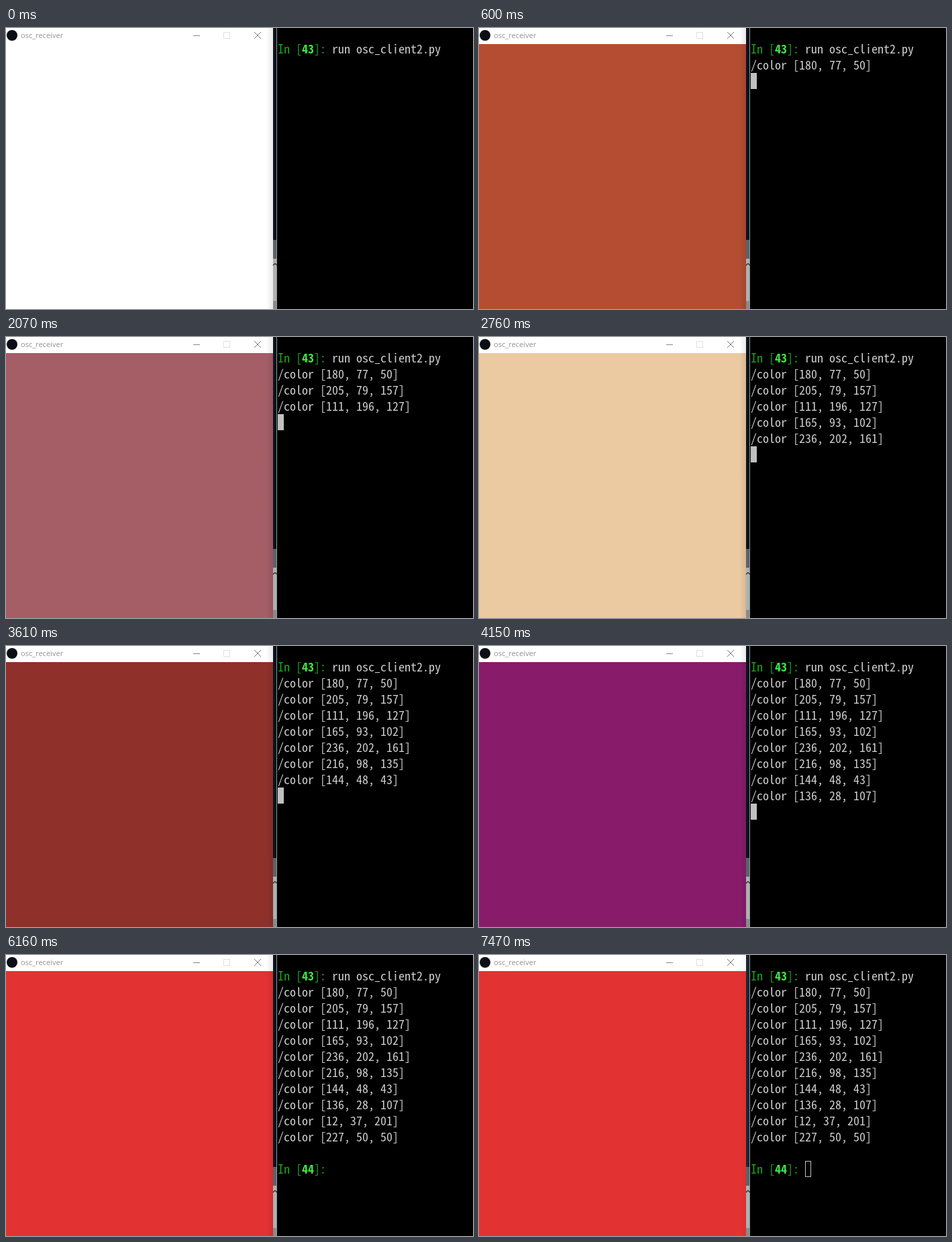
Animation of 696 by 419 pixels, one loop 7550 ms. Source, as an HTML page with a canvas:

```html
<!DOCTYPE html>
<html>
<head>
<meta charset="utf-8">
<style>
html, body { margin: 0; width: 100%; height: 100%; overflow: hidden; background: #000; }
canvas { display: block; }
</style>
</head>
<body>
<canvas id="stage" width="696" height="419"></canvas>
<script>
const ctx = document.getElementById('stage').getContext('2d');
const LOOP = 7550, LEFT = 405, TOP = 19, CELL = 9, LINE = 24;
const TEXT = '#ccc', GREY = '#c0c0c0', GREEN = '#16a816', BRIGHT = '#3fe63f';
const MONO = '"Noto Sans Mono CJK JP", "Noto Sans Mono", monospace';

const colors = `180, 77, 50
205, 79, 157
111, 196, 127
165, 93, 102
236, 202, 161
216, 98, 135
144, 48, 43
136, 28, 107
12, 37, 201
227, 50, 50`.split('\n');

// Messages go out at a steady rate; the screen refreshes once per tick
const START = 598, TICK = 77.2, TICKS_PER_MESSAGE = 6.45, PRINT_LAG = .3;
const PROMPT = 5620, BLINK = 515, UNFOCUS = 7470;

const shownAt = (i, lag = 0) =>
  START + TICK * Math.floor(i * TICKS_PER_MESSAGE + .6 + lag);

// Font size that gives one character per cell
ctx.font = `18px ${MONO}`;
const monoSize = 18 * CELL / ctx.measureText('0').width;

function rect(x, y, w, h, color) {
  ctx.fillStyle = color;
  ctx.fillRect(x, y, w, h);
}

function box(x, y, w, h, color) {
  ctx.strokeStyle = color;
  ctx.lineWidth = 1;
  ctx.strokeRect(x + .5, y + .5, w - 1, h - 1);
}

function line(x1, y1, x2, y2, color, width = 1) {
  ctx.strokeStyle = color;
  ctx.lineWidth = width;
  ctx.beginPath();
  ctx.moveTo(x1, y1);
  ctx.lineTo(x2, y2);
  ctx.stroke();
}

function print(text, col, row, color = TEXT, weight = 400) {
  ctx.font = `${weight} ${monoSize}px ${MONO}`;
  ctx.fillStyle = color;
  ctx.fillText(text, LEFT + col * CELL, TOP + row * LINE + 19);
}

function prompt(number, row) {
  print('In [', 0, row, GREEN);
  print(number, 4, row, BRIGHT, 700);
  print(']:', 6, row, GREEN);
}

function cursor(col, row, draw = rect) {
  draw(LEFT + col * CELL, TOP + row * LINE, CELL, LINE, GREY);
}

function drawWindow(fill, shadow) {
  rect(0, 0, 398, 24, '#fff');
  rect(0, 24, 398, 395, fill);
  const shade = ctx.createLinearGradient(388, 0, 398, 0);
  shade.addColorStop(0, 'rgba(0,0,0,0)');
  shade.addColorStop(1, `rgba(0,0,0,${shadow})`);
  rect(388, 0, 10, 419, shade);

  ctx.fillStyle = '#0c0e16';
  ctx.beginPath();
  ctx.arc(9, 11, 8, 0, 7);
  ctx.fill();
  ctx.font = '11px "Noto Sans", sans-serif';
  ctx.fillStyle = '#999';
  ctx.fillText('osc_receiver', 22, 15);

  line(279, 11.5, 289, 11.5, '#888');
  box(324, 6, 10, 10, '#e0e0e0');
  line(370, 6, 380, 16, '#777');
  line(380, 6, 370, 16, '#777');
}

function drawEdge(color) {
  rect(398, 0, 5, 316, color);
  rect(398, 316, 5, 28, '#5e6168');
  rect(398, 344, 5, 63, '#b0b0b0');
  rect(398, 407, 5, 12, '#8a8a8a');
  rect(403, 0, 1, 419, '#8a979c');
  line(398, 354, 401, 351, '#3c342c', 1.5);
  line(401, 351, 404, 354, '#3c342c', 1.5);
}

function drawTerminal(t) {
  rect(404, 0, 292, 419, '#000');
  prompt('43', 0);
  print('run osc_client2.py', 9, 0);
  const printed = colors.filter((_, i) => t >= shownAt(i, PRINT_LAG));
  printed.forEach((color, i) => print(`/color [${color}]`, 0, i + 1));

  if (t >= PROMPT) {
    prompt('44', 12);
    if (t >= UNFOCUS) cursor(9, 12, box);
    else if (Math.floor((t - PROMPT) / BLINK) % 2 === 0) cursor(9, 12);
  } else if (printed.length) {
    cursor(0, printed.length + 1);
  } else if (t >= 150) {
    cursor(27, 0);
  }
}

function frame() {
  const t = performance.now() % LOOP;
  const focused = t < UNFOCUS;
  const fill = colors.filter((_, i) => t >= shownAt(i)).pop();
  drawTerminal(t);
  drawWindow(fill ? `rgb(${fill})` : '#fff', focused ? .09 : .03);
  drawEdge(focused ? '#0b131b' : '#1c2530');
  requestAnimationFrame(frame);
}
frame();
</script>
</body>
</html>
```
